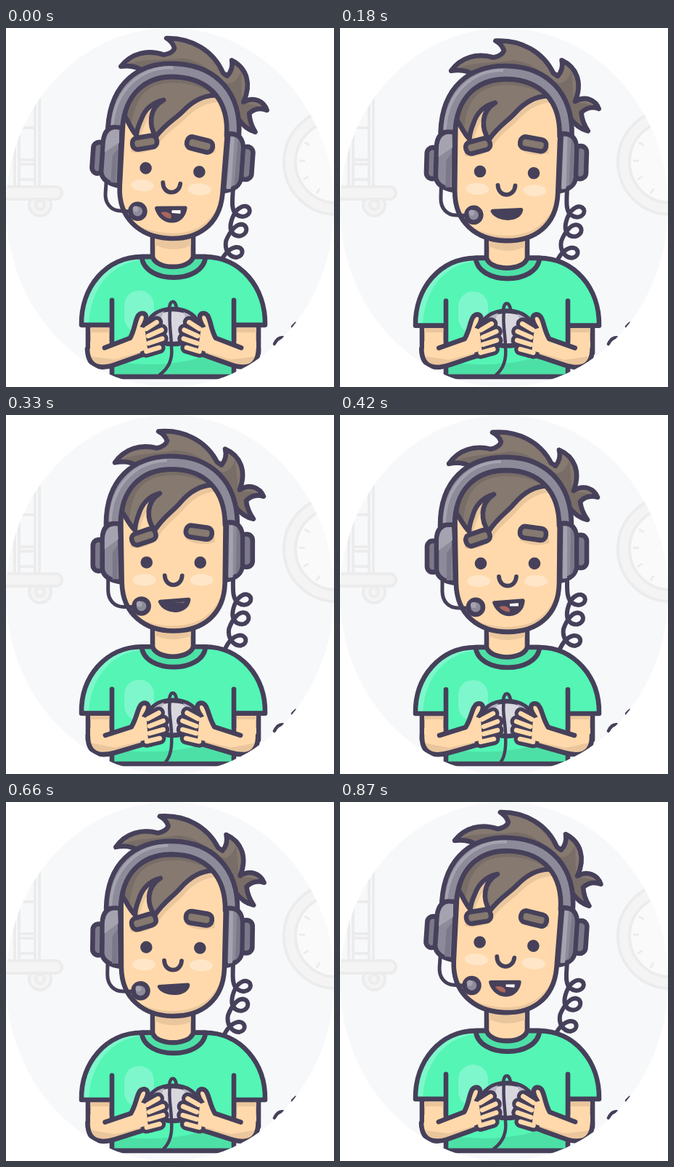
Recreate the animation shown at these times as an HTML page. Size 452 px wide and 493 px high, loop 900 ms.

```html
<!DOCTYPE html>
<html lang="en">
<head>
<meta charset="utf-8">
<title>Support agent</title>
<style>
  html, body { margin: 0; width: 100%; height: 100%; overflow: hidden; background: #fff; }
  svg { display: block; width: 452px; height: 493px; }
  .o { stroke: #46405a; stroke-width: 6.6; stroke-linecap: round; stroke-linejoin: round; }
  .thin { stroke-width: 4.5; }
  .n { fill: none; }
  .dark { fill: #46405a; }
  .skin { fill: #ffd9ab; }
  .skin2 { fill: #eac69d; }
  .shirt { fill: #54f5b5; }
  .shirt2 { fill: #4de0a6; }
  .shirt3 { fill: #7df7cb; }
  .hair { fill: #857970; }
  .hair2 { fill: #786d67; }
  .grey { fill: #8d8b9a; }
  .grey2 { fill: #7b7989; }
  .grey3 { fill: #a5a3b0; }
  .faint { fill: #f4f4f5; stroke: #ececed; stroke-width: 4; }
  .finger { fill: none; stroke-linecap: round; }
</style>
</head>
<body>
<svg viewBox="0 0 452 493">
  <defs>
    <clipPath id="disc"><ellipse cx="226" cy="246.5" rx="226" ry="246.5"/></clipPath>
    <clipPath id="mouthClip"><path id="lips"/></clipPath>
    <path id="face" d="M158 120L160 232C161 275 192 298 231 298C272 298 301 275 302 232L303 120C290 70 170 70 158 120Z"/>
    <clipPath id="faceClip"><use href="#face"/></clipPath>
    <path id="fringe" d="M160 135C162 100 190 77 228 76C262 76 284 86 293 98C270 95 252 108 240 122C230 134 217 141 205 160C194 146 192 122 212 109C197 113 187 124 183 138C180 146 178 152 178 160C168 150 164 138 160 135Z"/>
    <clipPath id="fringeClip"><use href="#fringe"/></clipPath>
    <path id="spikes" d="M182 72C172 65 160 65 150 67C163 48 185 41 208 47C216 45 221 41 222 37C220 31 216 27 210 24C245 21 276 37 291 66L297 70C303 63 304 56 302 48C323 57 332 78 322 104C336 95 350 101 355 113C346 110 338 112 331 119C332 128 336 137 341 144C331 142 323 136 316 127L300 92Z"/>
    <clipPath id="spikesClip"><use href="#spikes"/></clipPath>
    <path id="torso" d="M104 411C103 360 138 319 187 319H274C323 319 358 360 357 411H314V480H146V411Z"/>
    <clipPath id="torsoClip"><use href="#torso"/></clipPath>
    <path id="fingers" d="M196 418L211 410M198 428L217 421M198 438L217 433M194 449L212 445"/>
    <g id="arm">
      <path class="skin" d="M113 440C112 470 135 468 150 464L198 452L204 420L192 415L199 404C199 393 188 393 185 401L173 428L137 440Z"/>
      <path class="skin2" d="M115 450C116 470 135 468 150 464L198 452L190 448L150 457Z"/>
      <path class="o n" d="M137 440L173 429C180 418 181 408 185 401C188 394 198 395 197 403C196 408 194 411 191 415M113 440C112 470 135 468 150 464L182 455Q190 452 200 453"/>
      <use class="finger" href="#fingers" stroke="#46405a" stroke-width="17"/>
      <use class="finger" href="#fingers" stroke="#ffd9ab" stroke-width="6.5"/>
      <path class="skin" d="M178 430L186 414L194 417L196 446L184 449Z"/>
    </g>
  </defs>

  <g clip-path="url(#disc)">
    <rect width="452" height="493" fill="#f7f8fa"/>
    <g class="faint">
      <path d="M12 90V217M18 90V217M40 90V217M46 90V217M18 137H40M18 181H40M18 187H40M18 208H40"/>
      <circle cx="47" cy="243" r="15"/><circle cx="47" cy="243" r="6"/>
      <rect x="-10" y="218" width="87" height="17" rx="8"/>
      <circle cx="455" cy="184" r="72"/>
      <circle cx="455" cy="184" r="56" fill="#fafafb"/>
      <circle class="n" cx="455" cy="184" r="47" stroke-width="8" stroke-dasharray="3 21.6"/>
    </g>
    <path class="o n thin" d="M370 434C373 427 377 425 381 425M395 410L399 406"/>

    <path id="cord" class="o n" style="stroke-width:6" d="M313 222C313 240 312 252 320 258C330 265 341 258 337 250C332 243 320 247 315 262C311 274 313 282 319 286C331 292 340 280 332 273C322 267 312 282 308 294C306 306 314 317 324 317C335 315 333 302 322 303C312 305 306 314 302 324"/>

    <path class="o skin" d="M113 405V446H146V405M348 405V446H314V405"/>
    <path class="skin" d="M116 430H145V460H116ZM345 430H316V460H345Z"/>
    <path class="skin2" d="M116 412H143V418H116ZM318 412H345V418H318Z"/>

    <g id="body">
      <use class="shirt" href="#torso"/>
      <g clip-path="url(#torsoClip)">
        <path class="shirt3" d="M100 415C100 355 140 315 190 315V323C145 326 114 362 114 415Z"/>
        <path class="shirt2" d="M146 458C200 468 280 462 314 430V482H146Z"/>
        <rect class="shirt3" x="163" y="364" width="41" height="56" rx="20"/>
      </g>
      <path class="o n" d="M146 479H314M146 478V377M314 478V377M146 410H104C103 360 138 319 187 319H274C323 319 358 360 357 410H314"/>
      <path class="o shirt2" d="M187 319C190 356 272 356 275 319Z"/>
      <path class="o skin" d="M202 285V319C207 337 253 337 258 319V285Z"/>
      <path class="skin2" d="M205 285H255V304C240 311 220 311 205 303Z"/>
    </g>

    <g id="mouse">
      <ellipse class="o" cx="230" cy="417" rx="35" ry="24" fill="#d9d7de"/>
      <path fill="#b9b7c3" d="M198 417C200 403 210 398 218 396C210 410 212 430 220 438C206 434 198 428 198 417ZM262 417C260 404 252 399 244 397C252 410 250 430 240 438C254 434 262 428 262 417Z"/>
      <path class="o n thin" d="M225 392C226 380 233 380 235 391"/>
    </g>
    <path id="cable" class="o n thin"/>
    <use href="#arm" id="leftArm"/>
    <use href="#arm" id="rightArm"/>

    <g id="head">
      <use class="hair" href="#spikes"/>
      <g clip-path="url(#spikesClip)">
        <path class="hair2" d="M150 67C175 53 205 56 232 50C262 50 272 66 290 76C303 86 312 74 316 62L320 104C330 108 342 104 355 113L330 150L290 100L180 80Z"/>
      </g>
      <use class="o n" href="#spikes"/>

      <use class="skin" href="#face"/>
      <g clip-path="url(#faceClip)">
        <path class="skin2" d="M160 240C168 282 200 291 232 291C270 290 292 272 303 232V305H160Z"/>
        <use class="skin2" href="#fringe" x="5" y="9"/>
        <path class="skin2" d="M172 183Q190 188 211 171L209 165L172 175ZM248 172Q266 183 288 176V168H248Z"/>
      </g>
      <use class="o n" href="#face"/>

      <use class="hair" href="#fringe"/>
      <path clip-path="url(#fringeClip)" class="hair2" d="M158 135C160 95 190 70 228 72C265 72 290 86 296 104C270 88 240 80 212 86C185 92 172 110 170 150Z"/>
      <use class="o n" href="#fringe"/>

      <path class="o grey" d="M138 152C138 90 175 58 228 58C282 58 319 92 319 152H302C302 105 275 76 228 76C185 76 158 105 158 152Z"/>
      <path class="n" stroke="#a5a3b0" stroke-width="4" d="M144 148C145 100 177 65 222 64"/>

      <path class="o n" style="stroke-width:5" d="M141 228V242C141 256 150 265 162 265H178"/>
      <rect class="o grey2" x="120" y="173" width="16" height="43" rx="8"/>
      <path class="o grey" d="M157 151H147Q134 153 133 170V213Q135 228 159 231Z"/>
      <path class="grey3" d="M154 154H148Q137 156 136 172V186L155 172Z"/>
      <path class="grey2" d="M147 227V190L154 180V227Z"/>
      <rect class="o grey2" x="323" y="165" width="17" height="45" rx="8"/>
      <path class="o grey" d="M304 149C320 147 326 156 326 170V208Q325 224 303 228Z"/>
      <path class="grey3" d="M308 153H313V224L307 225Z"/>
      <path class="grey2" d="M318 156C323 160 323 165 323 172V208Q322 217 317 220Z"/>

      <circle class="o grey" cx="187" cy="264" r="10"/>
      <circle class="grey3" cx="184" cy="261" r="4"/>

      <ellipse cx="191" cy="228" rx="16" ry="8" fill="#ffe6c9"/>
      <ellipse cx="270" cy="228" rx="16" ry="8" fill="#ffe6c9"/>
      <circle class="dark" cx="194" cy="204" r="8.3"/>
      <circle class="dark" cx="268" cy="204" r="8.3"/>
      <path class="o n" style="stroke-width:5.8" d="M219 222C220 239 242 239 243 222"/>
      <rect id="leftBrow" class="o hair" x="-17" y="-8" width="34" height="16" rx="7"/>
      <rect id="rightBrow" class="o hair" x="-18" y="-8" width="36" height="16" rx="7"/>

      <use class="dark" href="#lips"/>
      <g clip-path="url(#mouthClip)">
        <ellipse id="tongue" cx="225" rx="9" ry="6" fill="#a9665c"/>
        <path id="teeth" fill="#fff"/>
      </g>
      <use class="o n" href="#lips" style="stroke-width:5.5"/>
    </g>
  </g>
</svg>
<script>
  const PERIOD = 900;
  const $ = id => document.getElementById(id);
  const set = (id, name, value) => $(id).setAttribute(name, value);
  const move = (id, value) => set(id, 'transform', value);

  function draw(now) {
    const phase = now % PERIOD / PERIOD * 2 * Math.PI;
    const lift = (1 + Math.cos(phase)) / 2;
    const tilt = lift * lift;
    const open = (1 + Math.cos(2 * phase)) / 2;

    move('head', `translate(${-1.5 * lift} ${-9 * lift}) rotate(${4 * tilt} 231 204)`);
    move('leftBrow', `translate(190 169) rotate(${-19 + 6 * tilt})`);
    move('rightBrow', `translate(266 ${162.5 + 4 * tilt}) rotate(${8 + 2 * tilt})`);
    move('body', `translate(0 ${-14.5 * lift}) scale(1 ${1 + 0.03 * lift})`);
    move('cord', `matrix(1 0 ${-0.065 * lift} 1 ${14.4 * lift} ${-2 * lift})`);
    move('mouse', `translate(0 ${-7 * lift})`);

    const swing = `rotate(${-4 * lift} 125 455)`;
    move('leftArm', swing);
    move('rightArm', `matrix(-1 0 0 1 460 0) ${swing}`);
    set('cable', 'd', `M226 ${393 - 8 * lift}C${223 + lift} 408 228 420 228 438
      C${229 + lift} 455 ${228 - 5 * lift} 468 ${222 - 10 * lift} 476`);

    const jaw = 269 + 10 * open;
    set('lips', 'd', `M213 258L252 255C250 ${jaw} 221 ${jaw + 1} 213 258Z`);
    set('tongue', 'cy', 279 - 11 * open);
    set('teeth', 'd', `M234 254H246V${255 + 8 * open}H234Z`);
    requestAnimationFrame(() => draw(performance.now()));
  }
  draw(0);
</script>
</body>
</html>
```
